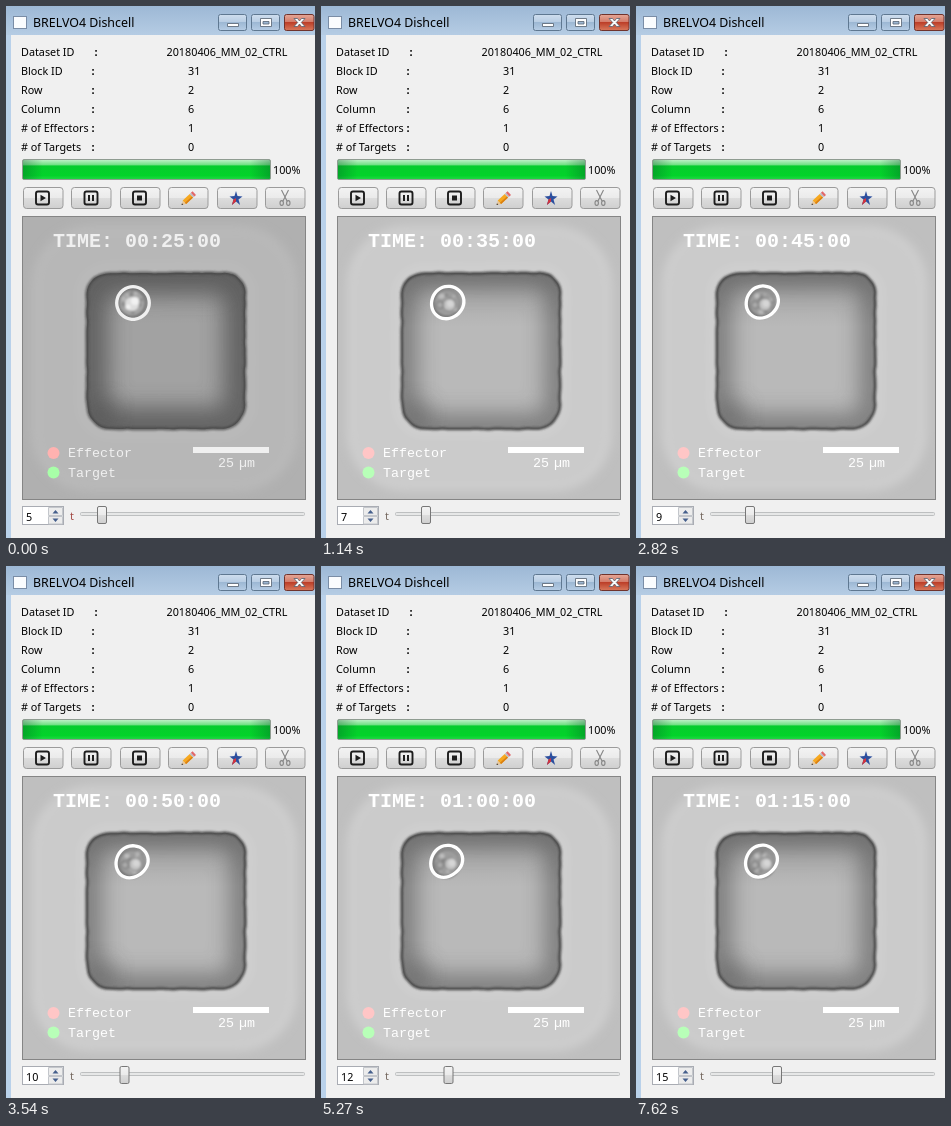
These frames come from a looping animation (309x532 px, 8 s). An HTML page:

```html
<!DOCTYPE html>
<html lang="en">
<head>
<meta charset="utf-8">
<title>Well viewer</title>
<style>
  html, body { margin: 0; width: 100%; height: 100%; overflow: hidden; background: #f0f0f0; }
  svg { display: block; width: 100%; height: 100%; }
  text { font: 10.8px "Noto Sans", "Open Sans", sans-serif; fill: #000; white-space: pre; }
  .title { font-size: 12.4px; }
  .colon { font-weight: bold; }
  .overlay text { font: 13.33px "Liberation Mono", monospace; fill: var(--ink); }
  .overlay .clock { font-size: 20px; font-weight: bold; }
  .scene {
    --ink: #fff; --plate: #bfbfbf; --glow: #cbcbcb; --halo: #d3d3d3; --floor: #b9b9b9;
    --shade: #555; --red: #ffc6c6; --green: #b8ffb8;
  }
  .scene.dim {
    --ink: #f0f0f0; --plate: #b0b0b0; --glow: #b7b7b7; --halo: #bdbdbd; --floor: #a2a2a2;
    --shade: #505050; --red: #ffb2b0; --green: #a8ffa8;
  }
</style>
</head>
<body>
<svg viewBox="0 0 309 532" preserveAspectRatio="none">
  <defs>
    <linearGradient id="bar" x2="0" y2="1"><stop stop-color="#9db8d5"/><stop offset="1" stop-color="#b5cce4"/></linearGradient>
    <linearGradient id="glass" x2="0" y2="1"><stop stop-color="#cfdeee"/><stop offset=".48" stop-color="#b8cde3"/><stop offset=".5" stop-color="#9db8d4"/><stop offset="1" stop-color="#b6cde5"/></linearGradient>
    <linearGradient id="close" x2="0" y2="1"><stop stop-color="#e5a797"/><stop offset=".48" stop-color="#d27a68"/><stop offset=".5" stop-color="#bd3f29"/><stop offset="1" stop-color="#d8795c"/></linearGradient>
    <linearGradient id="button" x2="0" y2="1"><stop stop-color="#f3f3f3"/><stop offset=".48" stop-color="#ebebeb"/><stop offset=".5" stop-color="#dddddd"/><stop offset="1" stop-color="#cfcfcf"/></linearGradient>
    <linearGradient id="progress" x2="0" y2="1"><stop stop-color="#c4f2cb"/><stop offset=".27" stop-color="#6fe082"/><stop offset=".32" stop-color="#06cc2c"/><stop offset=".8" stop-color="#02d32a"/><stop offset="1" stop-color="#22d845"/></linearGradient>
    <linearGradient id="ends"><stop stop-color="#042" stop-opacity=".3"/><stop offset=".08" stop-color="#042" stop-opacity="0"/><stop offset=".92" stop-color="#042" stop-opacity="0"/><stop offset="1" stop-color="#042" stop-opacity=".3"/></linearGradient>
    <linearGradient id="topShade" x2="0" y2="1"><stop stop-opacity=".18"/><stop offset=".35" stop-opacity="0"/></linearGradient>
    <filter id="soft1" x="-20%" y="-20%" width="140%" height="140%"><feGaussianBlur stdDeviation=".8"/></filter>
    <filter id="soft4" x="-20%" y="-20%" width="140%" height="140%"><feGaussianBlur stdDeviation="4"/></filter>
    <filter id="soft11" x="-60%" y="-60%" width="220%" height="220%"><feGaussianBlur stdDeviation="11"/></filter>
    <clipPath id="view"><path d="M17 211h282v282h-282z"/></clipPath>
    <clipPath id="pit"><path class="wellPath"/></clipPath>
  </defs>

  <rect width="309" height="532" fill="#b9d1ea"/>
  <rect width="309" height="29" fill="url(#bar)"/>
  <rect x="5" y="29" width="304" height="503" fill="#f0f0f0"/>
  <rect x="7.5" y="10.5" width="13" height="12" fill="#fafcfe" stroke="#7a8da6"/>
  <text class="title" x="27" y="21">BRELVO4 Dishcell</text>
  <g stroke="#5f7891">
    <rect x="212.5" y="8.5" width="28" height="16" rx="2" fill="url(#glass)"/>
    <rect x="245.5" y="8.5" width="28" height="16" rx="2" fill="url(#glass)"/>
    <rect x="278.5" y="8.5" width="29.5" height="16" rx="2" fill="url(#close)" stroke="#70332c"/>
  </g>
  <g fill="#fff" stroke="#53606f" stroke-width=".8">
    <path d="M221.500 17.500h11v3h-11z"/>
    <path fill-rule="evenodd" d="M254.500 12.500h11v8h-11zM257 15.500v2.500h6v-2.500z"/>
    <path d="M288 12.500h3.500l2 2.500 2-2.500h3.500l-3.700 4 3.700 4h-3.500l-2-2.500-2 2.500h-3.500l3.700-4z"/>
  </g>

  <g id="fields"></g>

  <rect x="16.500" y="153.500" width="248" height="20" rx="1.500" fill="url(#progress)" stroke="#8f9c91"/>
  <rect x="17" y="154" width="247" height="19" fill="url(#ends)"/>
  <text x="267" y="168">100%</text>

  <g id="buttons" fill="url(#button)" stroke="#9b9b9b"></g>
  <g fill="none" stroke="#1d1d1d" stroke-width="1.900">
    <rect x="30" y="185.500" width="13" height="13" rx="2"/>
    <rect x="78.500" y="185.500" width="13" height="13" rx="2"/>
    <rect x="127" y="185.500" width="13" height="13" rx="2"/>
  </g>
  <path d="M34.500 188.700l5.500 3.300-5.500 3.300zM82 189h2v6h-2zM86 189h2v6h-2zM131 189.500h5v5h-5z" fill="#1d1d1d"/>
  <g transform="translate(175.500 199) rotate(-43)">
    <path d="M0 0l4-2.500v5z" fill="#e8c69a"/>
    <path d="M0 0l1.600-1v2z" fill="#333"/>
    <path d="M4-2.500h9.500v5h-9.500z" fill="#f6a821"/>
    <path d="M4 .8h9.500v1.700h-9.500z" fill="#d97f12"/>
    <path d="M13.500-2.500h1.700v5h-1.700z" fill="#b9bec6"/>
    <path d="M15.200-2.500h2.300v5h-2.300z" fill="#e2686a"/>
  </g>
  <path d="M230 185l1.500 5 5 .4-4 3.100 1.600 5.500-4.100-3.400-4.100 3.400 1.600-5.500-4-3.100 5-.4z" fill="#2c4f9e"/>
  <path d="M230 185v10.600l-4.100 3.400 1.600-5.500 2.500-1.500z" fill="#d4333d"/>
  <g fill="none" stroke="#858585" stroke-width="1.100">
    <path d="M275.500 184l5.500 11M282.500 184l-5.500 11"/>
    <ellipse cx="275.700" cy="197" rx="1.700" ry="2.400"/>
    <ellipse cx="282.300" cy="197" rx="1.700" ry="2.400"/>
  </g>

  <g class="scene" id="scene">
    <g clip-path="url(#view)">
      <rect x="17" y="211" width="282" height="282" fill="var(--plate)"/>
      <g fill="none" stroke="var(--halo)" filter="url(#soft4)">
        <rect x="29" y="223" width="259" height="259" rx="56" fill="var(--glow)" stroke-width="9" stroke-opacity=".5"/>
        <path class="wellPath" stroke-width="18" opacity=".5"/>
      </g>
      <path class="wellPath" fill="var(--floor)"/>
      <g clip-path="url(#pit)">
        <path id="shade" class="wellPath" fill="none" stroke="var(--shade)" filter="url(#soft11)"/>
        <circle cx="96" cy="408" r="15" fill="var(--shade)" opacity=".45" filter="url(#soft11)"/>
        <rect id="topDark" x="78" y="264" width="165" height="162" fill="url(#topShade)"/>
      </g>
      <path id="edge" class="wellPath" fill="none" stroke="#3c3c3c" stroke-linejoin="round" filter="url(#soft1)"/>
      <g id="cell" filter="url(#soft1)"></g>
      <path id="outline" fill="none" stroke="var(--ink)" stroke-width="3.300"/>
    </g>
    <rect x="16.500" y="210.500" width="283" height="283" fill="none" stroke="#858585"/>
    <g class="overlay">
      <text class="clock" id="clock" x="47" y="241"></text>
      <circle cx="47.500" cy="447" r="6" fill="var(--red)"/>
      <circle cx="47.500" cy="466.500" r="6" fill="var(--green)"/>
      <text x="62" y="451">Effector</text>
      <text x="62" y="471">Target</text>
      <rect x="187" y="441" width="76" height="6" fill="var(--ink)"/>
      <text x="212" y="461">25</text>
      <text x="233" y="461">µm</text>
    </g>
  </g>

  <rect x="16.500" y="500.500" width="41" height="18" fill="#fff" stroke="#a9acb3"/>
  <path d="M42.500 501.500h14v8h-14zM42.500 510.500h14v7.500h-14z" fill="#ececec" stroke="#c3c6cb"/>
  <path d="M46.500 507.500l3-3.500 3 3.500zM46.500 512.500l3 3.500 3-3.500z" fill="#455f8c"/>
  <text id="count" x="20" y="514.500"></text>
  <text id="unit" x="64" y="514">t</text>
  <rect x="74.500" y="506.500" width="224" height="3" rx="1" fill="#e6e7e7" stroke="#bdbfc0"/>
  <rect id="thumb" y="500.500" width="9" height="17" rx="1.500" fill="url(#button)" stroke="#777"/>
</svg>
<script>
const LOOP = 8000;
const STARTS = [0, 400, 1140, 1980, 2820, 3540, 4400, 5270, 6010, 6750, 7620];
const FIRST = 5;
const $ = id => document.getElementById(id);
const set = (id, attrs) => {
  for (const name in attrs) $(id).setAttribute(name, attrs[name]);
};

function random(seed) {
  return () => (seed = (seed * 16807) % 2147483647) / 2147483647;
}

function smoothLoop(points) {
  const mid = (a, b) => `${((a[0] + b[0]) / 2).toFixed(2)} ${((a[1] + b[1]) / 2).toFixed(2)}`;
  const curves = points.map((p, i) =>
    `Q${p[0].toFixed(2)} ${p[1].toFixed(2)} ${mid(p, points[(i + 1) % points.length])}`);
  return `M${mid(points.at(-1), points[0])}${curves.join('')}Z`;
}

// Rounded square with an uneven rim: centre and radius of each corner.
function wellPath() {
  const corners = [[102, 288, 21], [220, 286, 19], [215, 399, 24], [105, 399, 24]];
  const rnd = random(77);
  const at = ([x, y, r], angle) => [x + r * Math.cos(angle), y + r * Math.sin(angle)];
  const points = [];
  corners.forEach((corner, i) => {
    const start = Math.PI * (1 + i / 2);
    for (let k = 0; k < 6; k++) points.push(at(corner, start + k * Math.PI / 12));
    const from = at(corner, start + Math.PI / 2);
    const to = at(corners[(i + 1) % 4], start + Math.PI / 2);
    for (let k = 0; k < 20; k++) {
      points.push(from.map((v, axis) => v + (to[axis] - v) * k / 20));
    }
  });
  return smoothLoop(points.map(p => p.map(v => v + (rnd() - .5) * 1.1)));
}

function outlinePath(n) {
  const drift = Math.min((n - FIRST) / 8, 1);
  const cx = 127 - 1.8 * drift, cy = 297 - 2 * drift;
  const stretch = n === FIRST ? 0 : .4 + .8 * drift;
  return smoothLoop(Array.from({ length: 20 }, (_, i) => {
    const a = i * Math.PI / 10;
    const r = 16.5 - .5 * drift + stretch * (Math.cos(2 * a + Math.PI / 2) + .3 * Math.cos(3 * a));
    return [cx + r * Math.cos(a), cy + r * Math.sin(a)];
  }));
}

function cellMarkup(n) {
  const rnd = random(n * 991 + 13);
  const disc = (x, y, r, fill, extra = '') =>
    `<circle cx="${x}" cy="${y}" r="${r}" fill="${fill}" ${extra}/>`;
  const early = n === FIRST;
  let out = disc(126 - (early ? 0 : 1), 298, 14.5, '#777') + disc(126, 297, 12.5, early ? '#a4a4a4' : '#9c9c9c');
  for (let i = 0; i < 14; i++) {
    const a = rnd() * 6.28, d = 4 + rnd() * 7;
    const tone = i % 2 ? '#c2c2c2' : '#808080';
    out += disc(126 + d * Math.cos(a), 297 + d * Math.sin(a), 1 + rnd() * 1.6, tone, 'opacity=".65"');
  }
  if (early) return out + disc(126, 298, 7, '#dedede') + disc(129, 295, 4, '#f2f2f2') + disc(122, 301, 2.5, '#f2f2f2');
  const shift = Math.min(n - 6, 6) / 3;
  return out
    + disc(128 + shift, 299 - shift / 2, 6.3, '#c2c2c2', 'stroke="#808080"')
    + disc(129 + shift, 298 - shift / 2, 3.5, '#d6d6d6')
    + disc(119, 299, 3.6, '#a8a8a8', 'stroke="#747474"')
    + disc(121, 290, 2.6, '#bebebe');
}

function show(n) {
  const early = n === FIRST;
  const minutes = n * 5;
  const two = v => String(v).padStart(2, '0');
  $('scene').classList.toggle('dim', early);
  $('clock').textContent = `TIME: ${two(Math.floor(minutes / 60))}:${two(minutes % 60)}:00`;
  $('count').textContent = n;
  $('cell').innerHTML = cellMarkup(n);
  set('unit', { style: `fill:${early ? '#a34a45' : '#75685f'}` });
  set('thumb', { x: 91.5 + (n - FIRST) * 4.5 });
  set('outline', { d: outlinePath(n) });
  set('shade', { 'stroke-width': early ? 44 : 30, opacity: early ? .75 : .6 });
  set('topDark', { opacity: early ? .3 : .8 });
  set('edge', { 'stroke-width': early ? 3 : 2.5, opacity: early ? .7 : .92 });
}

const fields = [
  ['Dataset ID', '20180406_MM_02_CTRL'], ['Block ID', '31'], ['Row', '2'],
  ['Column', '6'], ['# of Effectors', '1'], ['# of Targets', '0']
];
$('fields').innerHTML = fields.map(([label, value], i) => {
  const y = 50 + i * 19;
  return `<text x="15" y="${y}">${label}</text><text class="colon" x="${i ? 85.5 : 88.5}" y="${y}">:</text>`
    + `<text x="${i ? 182 : 160.5}" y="${y}">${value}</text>`;
}).join('');
$('buttons').innerHTML = Array.from({ length: 6 }, (_, i) =>
  `<rect x="${Math.round(17 + i * 48.4) + .5}" y="181.5" width="39.5" height="21" rx="3"/>`).join('');
const rim = wellPath();
document.querySelectorAll('.wellPath').forEach(path => path.setAttribute('d', rim));

let shown;
function tick() {
  const time = performance.now() % LOOP;
  const n = FIRST + STARTS.findLastIndex(start => start <= time);
  if (n !== shown) show(shown = n);
  requestAnimationFrame(tick);
}
tick();
</script>
</body>
</html>
```
